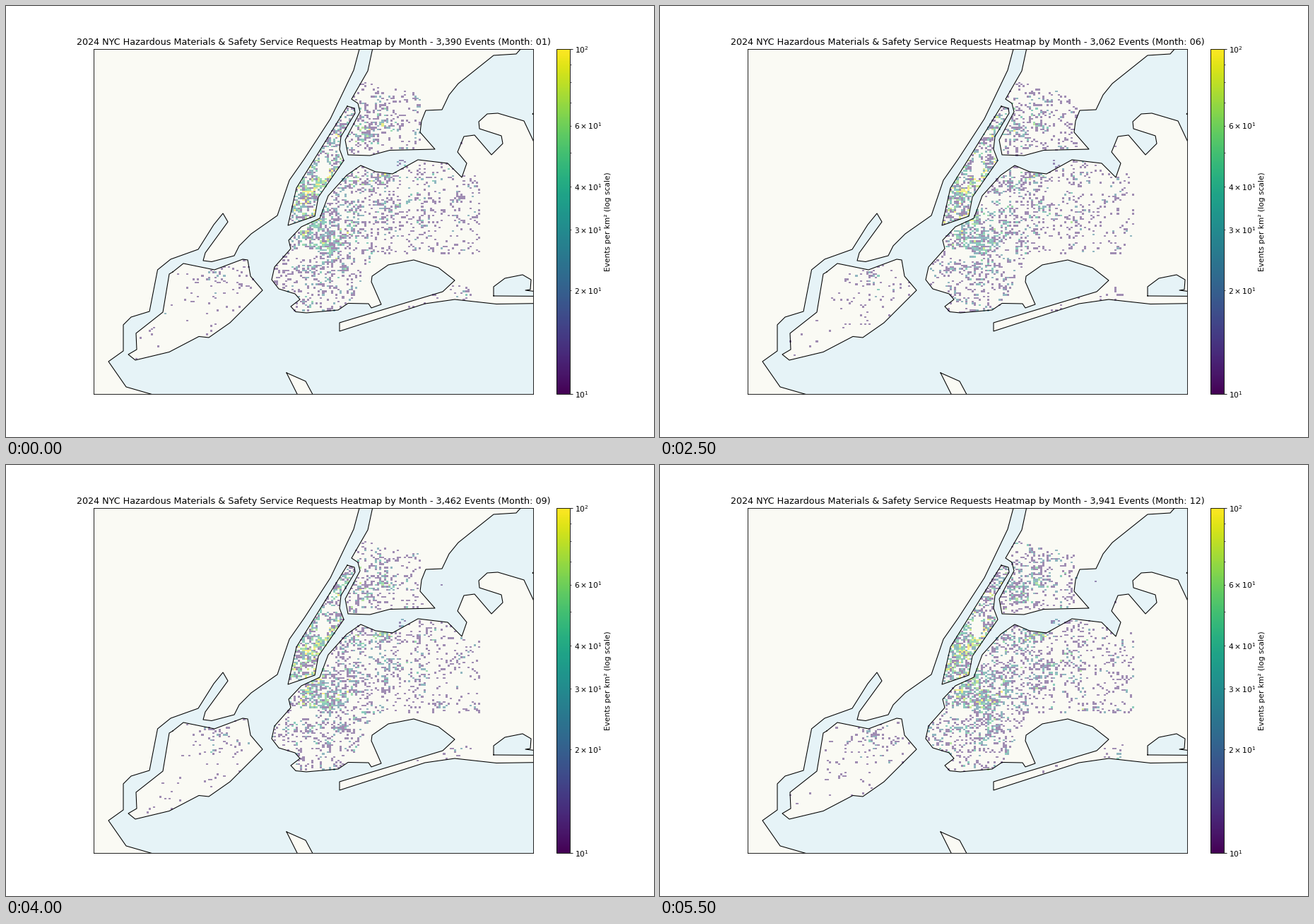
These frames come from a looping animation (917x611 px, 6 s). A matplotlib script:

```python
import numpy as np
import matplotlib.pyplot as plt
from matplotlib.animation import FuncAnimation
from matplotlib.cm import ScalarMappable
from matplotlib.colors import LogNorm
from matplotlib.path import Path

W, H, DPI = 917, 611, 76.4
LEFT, RIGHT, TOP, BOTTOM = 124, 746, 0.1 * H, 0.9 * H
BINS = 200
EVENTS_PER_KM2 = 12.4
LAND, WATER = "#fafaf4", "#e6f3f7"
MONTHLY = [3390, 2924, 3016, 2982, 3047, 3062, 3208, 3145, 3462, 7724, 10486, 3941]
USUAL = 3900  # events beyond this spread over the outer boroughs

# Coast corners in stage pixels; closing points lie outside the map frame.
MAINLAND = [
    (503, 50), (492, 91), (459, 160), (422, 217), (401, 247), (384, 297),
    (347, 323), (330, 340), (323, 354), (291, 362.5), (279, 361), (282, 350),
    (314, 306), (307, 294), (294, 310), (272, 345), (233, 359), (214.5, 374),
    (203, 433), (177, 441), (166, 452), (166, 489), (145, 504), (170, 540),
    (222, 555), (110, 560), (110, 50)]
STATEN = [
    (236, 377), (251, 365), (295, 374), (335, 359), (342, 360), (346, 383),
    (363, 403), (317, 449), (287, 470), (273, 468.5), (231, 490.5),
    (183, 502), (173, 494), (185, 487), (184, 464), (222, 434), (231, 380)]
MANHATTAN = [
    (483, 142), (493, 145), (494, 152), (474, 185), (472, 203), (478, 219),
    (442, 271), (437, 298), (399, 311), (411, 258)]
BRONX = [
    (521, 50), (512, 92), (489, 132), (498, 138), (501, 150), (480, 190),
    (484, 211), (515, 212), (543, 204.5), (607, 203), (586, 179), (588, 163),
    (594, 148), (617, 147), (627, 126), (640, 110), (690, 70), (722, 68),
    (738, 50)]
NORTH_SHORE = [
    (756, 212), (733, 163), (696, 152), (681, 153), (669, 164), (670, 174),
    (701, 184), (703, 195), (687, 211), (663, 183), (648, 185), (639, 207),
    (652, 223), (645, 243), (625, 223), (583, 218), (547, 238), (523, 235),
    (502, 226), (482, 240), (456, 269), (444, 301), (418, 313), (400, 332),
    (403, 344), (380, 370), (376, 388)]
SOUTH_SHORE = [
    (386, 401), (409, 408), (416, 416), (403, 426), (410, 433.5), (425, 435),
    (470, 431), (484, 421.5), (513, 422), (517, 428), (531, 423), (517, 391),
    (518, 383), (541, 367), (577, 360), (612, 371), (635, 389), (618, 405),
    (472, 449), (472, 461), (593, 422), (635, 416), (694, 422.5), (760, 421.5)]
LONG_ISLAND = NORTH_SHORE + SOUTH_SHORE
HOOK = [(397, 520), (424, 532), (439, 560), (417, 560)]
CORNER = [(760, 140), (745, 153), (760, 165)]
EAST_BAY = [
    (690, 411), (690, 398), (706, 386), (731, 381), (743, 388), (742, 402),
    (735, 403), (760, 406), (760, 411.5)]

x_edges = np.linspace(LEFT, RIGHT, BINS + 1)
y_edges = np.linspace(TOP, BOTTOM, BINS + 1)
X, Y = np.meshgrid((x_edges[1:] + x_edges[:-1]) / 2, (y_edges[1:] + y_edges[:-1]) / 2)
rng = np.random.default_rng(2024)


def inside(points):
    cells = np.column_stack([X.ravel(), Y.ravel()])
    return Path(points).contains_points(cells).reshape(X.shape)


def disc(x, y, rx, ry):
    return ((X - x) / rx) ** 2 + ((Y - y) / ry) ** 2 < 1


def patches(strength, waves=40):
    """Smooth random neighbourhoods, busy in some places and empty in others."""
    total = 0
    for angle, length, phase in rng.random((waves, 3)):
        k = 2 * np.pi / (25 + 45 * length)
        u = X * np.cos(np.pi * angle) + Y * np.sin(np.pi * angle)
        total = total + np.cos(k * u + 2 * np.pi * phase)
    return np.exp(strength * total / np.sqrt(waves / 2))


def spread(mask, x, y, size, floor):
    near = np.exp(-((X - x) ** 2 + (Y - y) ** 2) / (2 * size ** 2))
    return mask * (floor + near)


island = inside(LONG_ISLAND)
city_east = (island & (X < 672) & ((X < 645) | (Y > 238))
             & ((Y < 352) | (X + 0.5 * (Y - 355) < 520)))
brooklyn = city_east & (Y - 275 > 0.85 * (X - 455))
central_park = disc(449, 230, 7, 16)

# Area, hot centre, its size, background level, share in usual and in busy months
BOROUGHS = [
    (inside(MANHATTAN) & ~central_park, 425, 265, 40, 0.7, 0.28, 0.08),
    (brooklyn & ~disc(424, 351, 18, 8), 448, 325, 22, 0.2, 0.33, 0.37),
    (city_east & ~brooklyn & ~disc(563, 266, 6, 14), 515, 260, 45, 0.3, 0.23, 0.31),
    (inside(BRONX) & (X < 590) & (Y > 108 + 0.2 * (X - 505)), 508, 165, 20, 0.3, 0.12, 0.12),
    (inside(STATEN), 300, 378, 25, 0.15, 0.03, 0.10),
    (island & (Y > 395) & (X > 540) & (X < 660), 640, 408, 15, 0.2, 0.006, 0.01),
    (disc(617, 170, 3, 7) | disc(560, 224, 6, 6), 617, 170, 5, 0.5, 0.003, 0.006)]


def density(share_column, strength, grain):
    texture = patches(strength) * rng.gamma(grain, 1, X.shape)
    total = 0
    for area in BOROUGHS:
        field = spread(*area[:5]) * texture
        total = total + area[share_column] * field / field.sum()
    return total


usual_density = density(5, 0.45, 1.1)
busy_density = density(6, 0.7, 1.0)


def heat(month):
    usual = min(MONTHLY[month], USUAL)
    extra = MONTHLY[month] - usual
    draws = np.random.default_rng(50 + month)
    counts = draws.poisson(usual * usual_density + extra * busy_density)
    return np.ma.masked_equal(counts * EVENTS_PER_KM2, 0)


maps = [heat(month) for month in range(12)]

fig = plt.figure(figsize=((W + .01) / DPI, (H + .01) / DPI), dpi=DPI, facecolor="white")


def add_axes(left, right):
    return fig.add_axes([left / W, 0.1, (right - left) / W, 0.8])


ax = add_axes(LEFT, RIGHT)
ax.set(xlim=(LEFT, RIGHT), ylim=(BOTTOM, TOP), xticks=[], yticks=[], facecolor=WATER)


def shape(points, color):
    ax.fill(*zip(*points), facecolor=color, edgecolor="none", zorder=0.5)
    ax.plot(*zip(*points, points[0]), color="black", lw=1, zorder=1.5)


for coast in (MAINLAND, STATEN, MANHATTAN, BRONX, LONG_ISLAND, HOOK, CORNER):
    shape(coast, LAND)
shape(EAST_BAY, WATER)

norm = LogNorm(10, 100)
mesh = ax.pcolormesh(x_edges, y_edges, maps[0], norm=norm, cmap="viridis", alpha=0.5, zorder=1)
title = ax.set_title("", fontsize=12)
fig.colorbar(ScalarMappable(norm, "viridis"), cax=add_axes(779.2, 797.9),
             label="Events per km² (log scale)")


def draw(month):
    mesh.set_array(maps[month])
    title.set_text("2024 NYC Hazardous Materials & Safety Service Requests Heatmap by Month"
                   f" - {MONTHLY[month]:,} Events (Month: {month + 1:02d})")
    return mesh, title


anim = FuncAnimation(fig, draw, frames=12, interval=500, repeat=True)
plt.show()
```
